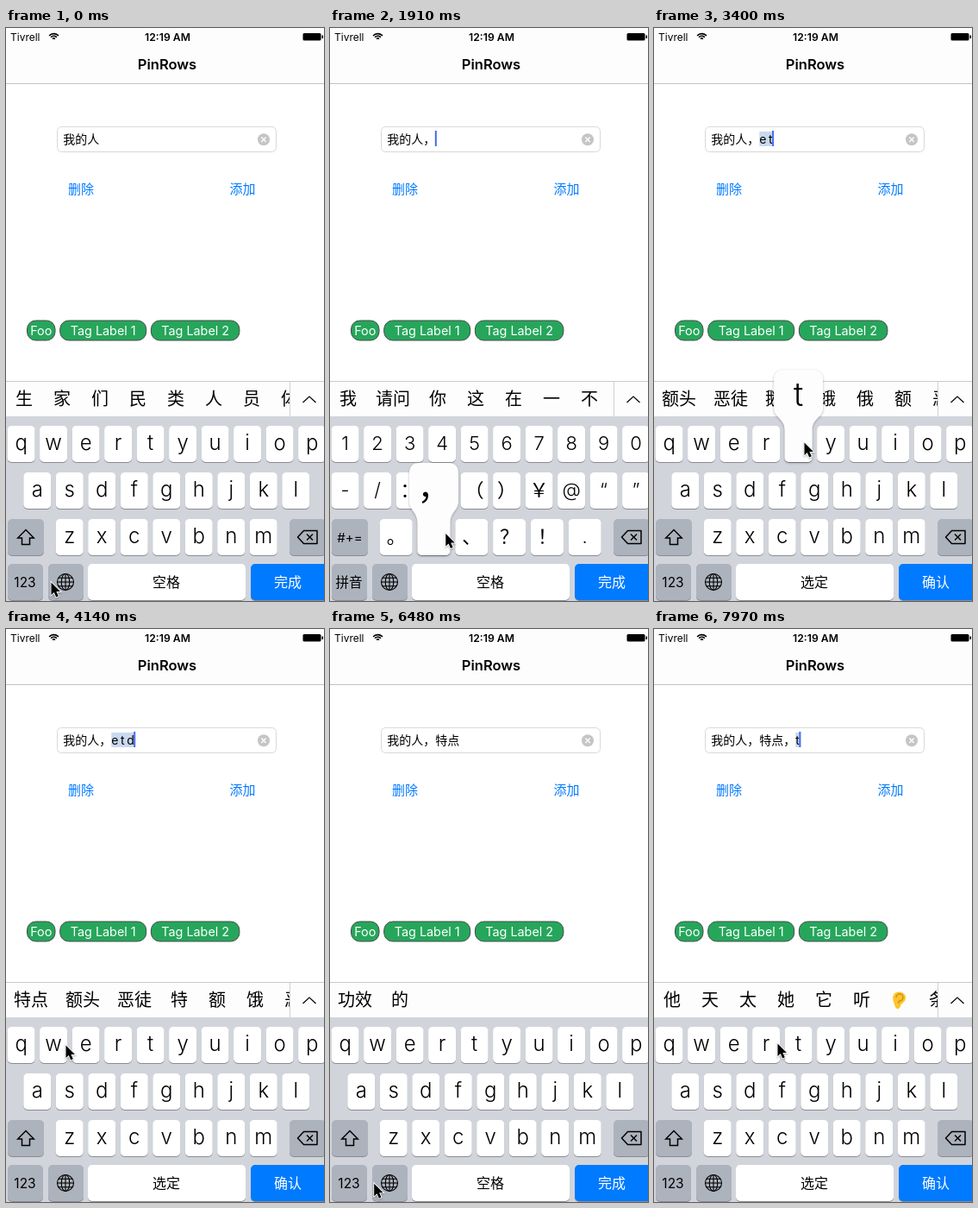
Animation of 369x664 px, one loop 8 s. Source, as an HTML page with a canvas:

```html
<!DOCTYPE html>
<html lang="zh">
<head>
<meta charset="utf-8">
<title>Tag keyboard</title>
<style>
html, body { margin: 0; width: 100%; height: 100%; overflow: hidden; background: #fff; }
canvas { display: block; width: 369px; height: 664px; }
</style>
</head>
<body>
<canvas id="stage"></canvas>
<script>
const W = 369, H = 664, LOOP = 8000, STEP = 147.5, HOLD = 2;
const canvas = document.getElementById('stage');
const c = canvas.getContext('2d');
const dpr = window.devicePixelRatio || 1;
canvas.width = W * dpr;
canvas.height = H * dpr;

const CJK = '"Noto Sans CJK SC", "Noto Sans CJK", sans-serif';
const FONT = 'Inter, ' + CJK;
const BLUE = '#007aff', GRAY = '#adb3bd';

// Pointer stops; a stop with a key is a tap, which drives everything else
const stops = [
  { at: 0, x: 52, y: 642 },
  { at: 9, x: 22, y: 638, key: '123' },
  { at: 12, x: 134, y: 586, key: '，' },
  { at: 17, x: 132, y: 581 },
  { at: 18, x: 98, y: 503 },
  { at: 20, x: 94, y: 487, key: 'e' },
  { at: 23, x: 174, y: 480, key: 't' },
  { at: 26, x: 110, y: 532, key: 'd' },
  { at: 30, x: 28, y: 432, key: '特点' },
  { at: 33, x: 65, y: 487 },
  { at: 39, x: 297, y: 644 },
  { at: 45, x: 31, y: 642, key: '123' },
  { at: 48, x: 134, y: 586, key: '，' },
  { at: 52, x: 165, y: 482, key: 't' },
  { at: 54, x: 143, y: 480 }
];

// Candidates by the latest input
const suggestions = {
  '人': '生 家 们 民 类 人 员 体',
  '，': '我 请问 你 这 在 一 不',
  'e': '额 饿 恶 鹅 俄 呃 而 二',
  'e t': '额头 恶徒 鹅头 蛾 俄 额 恶',
  'e t d': '特点 额头 恶徒 特 额 饿 恶',
  '点': '功效 的',
  't': '他 天 太 她 它 听 👂 条'
};

// Replays the taps up to step n
function stateAt(n) {
  const s = { text: '我的人', comp: '', numeric: false, edit: -6, press: '' };
  for (const { at, key } of stops.filter(p => p.key && p.at <= n)) {
    const held = n < at + HOLD;
    if (key === '123') {
      s.numeric = true;
      continue;
    }
    if (/[a-z]/.test(key)) {
      s.comp += (s.comp && ' ') + key;
    } else {
      s.text += key;
      s.comp = '';
      s.edit = at + 1;
    }
    s.numeric = s.numeric && held;
    s.press = held ? key : '';
  }
  s.words = suggestions[s.comp || s.text.slice(-1)].split(' ');
  s.caret = s.comp || n - s.edit < 4 ? 1 : blink(n - s.edit);
  return s;
}

function blink(age) {
  return Math.min(1, Math.max(0, .5 + 2 * Math.cos(2 * Math.PI * (age - 3.25) / 7)));
}

function text(s, x, y, size, { color = '#000', align = 'left', weight = 400, family = FONT } = {}) {
  c.font = `${weight} ${size}px ${family}`;
  c.textAlign = align;
  c.fillStyle = color;
  c.fillText(s, x, y);
}

function rect(x, y, w, h, color) {
  c.fillStyle = color;
  c.fillRect(x, y, w, h);
}

function round(x, y, w, h, r, fill, stroke) {
  c.beginPath();
  c.roundRect(x, y, w, h, r);
  c.fillStyle = fill;
  c.fill();
  if (!stroke) return;
  c.strokeStyle = stroke;
  c.lineWidth = 1;
  c.stroke();
}

function line(points, width = 1, color = '#000', close = false) {
  c.beginPath();
  points.forEach(([x, y]) => c.lineTo(x, y));
  if (close) c.closePath();
  c.strokeStyle = color;
  c.lineWidth = width;
  c.stroke();
}

function cross(x, y, r, width, color) {
  line([[x - r, y - r], [x + r, y + r]], width, color);
  line([[x + r, y - r], [x - r, y + r]], width, color);
}

function header() {
  rect(0, 0, W, 64, '#fdfdfd');
  rect(0, 64, W, 1, '#c2c2c2');
  text('Tivrell', 5, 14.5, 12);
  c.strokeStyle = '#000';
  c.lineWidth = 1.6;
  for (const r of [2, 4.7, 7.4]) {
    c.beginPath();
    c.arc(55.5, 14, r, -Math.PI * .76, -Math.PI * .24);
    c.stroke();
  }
  text('12:19 AM', 187.5, 14.5, 12.2, { align: 'center', weight: 600 });
  round(344.5, 6, 21, 8.5, 1.5, '#000');
  rect(366.5, 8.5, 1.5, 3.5, '#000');
  text('PinRows', 187, 48, 16.5, { align: 'center', weight: 600 });
}

function form({ text: value, comp, caret }) {
  round(59.5, 114.5, 254, 29, 5, '#fff', '#d9d9d9');
  text(value, 66.3, 133.7, 14, { family: CJK });
  const x = 66.3 + value.length * 14;
  const spaced = comp.replace(/ /g, '\u2009');
  c.font = `400 14px ${FONT}`;
  const w = c.measureText(spaced).width;
  rect(x, 120, w, 17, '#c9d9ef');
  text(spaced, x, 133.7, 14);
  c.globalAlpha = caret;
  rect(x + w - .5, 119, 2, 18, '#426bf2');
  c.globalAlpha = 1;

  round(292, 122.3, 14, 14, 7, '#c5c5c8');
  cross(299, 129.3, 2.7, 1.4, '#fff');
  text('删除', 72, 191.7, 15, { color: BLUE, family: CJK });
  text('添加', 259.5, 191.7, 15, { color: BLUE, family: CJK });

  let left = 24.5;
  for (const [label, width] of [['Foo', 32.5], ['Tag Label 1', 100], ['Tag Label 2', 102.5]]) {
    round(left, 339, width, 23, 10, '#26a65b', '#454d48');
    text(label, left + width / 2, 356, 14.4, { color: '#fff', align: 'center' });
    left += width + 5.7;
  }
}

function ear(x, y) {
  c.beginPath();
  c.moveTo(x - 5, y + 8);
  c.bezierCurveTo(x - 7, y + 2, x - 9, y - 2, x - 7, y - 6);
  c.bezierCurveTo(x - 4, y - 12, x + 7, y - 10, x + 7, y - 3);
  c.bezierCurveTo(x + 7, y + 3, x + 2, y + 3, x + 1, y + 7);
  c.bezierCurveTo(x, y + 11, x - 4, y + 11, x - 5, y + 8);
  c.fillStyle = '#fbc62c';
  c.fill();
  c.beginPath();
  c.arc(x, y - 3, 4, Math.PI, Math.PI * 2.3);
  c.quadraticCurveTo(x - 2, y + 1, x - 1, y + 4);
  c.strokeStyle = '#d58a1c';
  c.lineWidth = 1.5;
  c.stroke();
}

function bar(words) {
  rect(0, 409, W, 41, '#fdfdfd');
  rect(0, 409, W, 1, '#c9cacc');
  const more = words.length > 2;
  c.save();
  c.beginPath();
  c.rect(0, 409, more ? 330 : W, 41);
  c.clip();
  let x = 0;
  for (const word of words) {
    const count = [...word].length, cell = count > 1 ? 60 : 44;
    if (word === '👂') ear(x + 21, 430);
    else text(word, x + cell / 2 - 1, 437, 20, { align: 'center', family: CJK });
    x += cell;
  }
  c.restore();
  if (!more) return;
  rect(329, 409, 1, 41, '#cfd0d2');
  line([[344.5, 434], [352, 427], [359.5, 434]], 1.2);
}

function cap(x, y, w, color = '#fff') {
  round(x, y + 1, w, 42, 5, '#898c91');
  round(x, y, w, 42, 5, color);
}

function keyRow(chars, x0, y, pitch = 37.5, w = 32) {
  return [...chars].map((s, i) => ({ s, x: x0 + i * pitch, y, w }));
}

const letters = [
  ...keyRow('qwertyuiop', 1.6, 461), ...keyRow('asdfghjkl', 20.3, 515), ...keyRow('zxcvbnm', 57.7, 569)
];
const symbols = [
  ...keyRow('1234567890', 1.6, 461), ...keyRow('-/：；（）￥@“”', 1.6, 515),
  ...keyRow('。，、？！.', 57.7, 569, 43.8, 38)
];

function popup({ s, x, y, w }) {
  const m = x + w / 2, top = y - 65, half = 28.5, foot = w / 2, bottom = y + 42;
  c.save();
  c.shadowColor = 'rgba(0,0,0,.28)';
  c.shadowBlur = 3;
  c.shadowOffsetY = 1;
  c.beginPath();
  c.moveTo(m, top);
  c.arcTo(m + half, top, m + half, top + 10, 10);
  c.lineTo(m + half, top + 44);
  c.bezierCurveTo(m + half, top + 56, m + foot, top + 56, m + foot, top + 70);
  c.arcTo(m + foot, bottom, m, bottom, 5);
  c.arcTo(m - foot, bottom, m - foot, top + 70, 5);
  c.lineTo(m - foot, top + 70);
  c.bezierCurveTo(m - foot, top + 56, m - half, top + 56, m - half, top + 44);
  c.arcTo(m - half, top, m, top, 10);
  c.fillStyle = '#fdfdfd';
  c.fill();
  c.restore();
  text(s, m, top + 42, 38, { align: 'center', weight: 350 });
}

function shiftIcon(x, y) {
  const side = d => [[9.3 * d, 1], [4.5 * d, 1], [4.5 * d, 8.5]].map(([dx, dy]) => [x + dx, y + dy]);
  line([[x, y - 8.5], ...side(1), ...side(-1).reverse()], 1.5, '#000', true);
}

function deleteIcon(x, y) {
  c.lineJoin = 'round';
  line([[x, y], [x + 7, y - 7.5], [x + 22.5, y - 7.5], [x + 22.5, y + 7.5], [x + 7, y + 7.5]], 1.5, '#000', true);
  cross(x + 14, y, 3.5, 1.5);
  c.lineJoin = 'miter';
}

function globe(x, y, r) {
  c.strokeStyle = '#000';
  c.lineWidth = 1.1;
  for (const rx of [r, r / 2, 0]) {
    c.beginPath();
    c.ellipse(x, y, rx, r, 0, 0, 7);
    c.stroke();
  }
  for (const dy of [-r / 2, 0, r / 2]) {
    const dx = Math.sqrt(r * r - dy * dy);
    line([[x - dx, y + dy], [x + dx, y + dy]], 1.1);
  }
}

function keyboard({ numeric, comp, press }) {
  rect(0, 450, W, 214, '#d1d5db');
  const keys = numeric ? symbols : letters;
  for (const k of keys) {
    cap(k.x, k.y, k.w);
    text(k.s, k.x + k.w / 2, k.y + 27.5, numeric ? 22 : 24, { align: 'center', weight: 350 });
  }
  cap(2, 569, 42, GRAY);
  if (numeric) text('#+=', 23, 595.5, 15, { align: 'center' });
  else shiftIcon(23, 590);
  cap(329, 569, 42, GRAY);
  deleteIcon(338.5, 590);

  cap(2, 621, 41, GRAY);
  text(numeric ? '拼音' : '123', 22, 647.7, 15.5, { align: 'center' });
  cap(49, 621, 41, GRAY);
  globe(69, 642, 9.5);
  cap(95, 621, 183);
  text(comp ? '选定' : '空格', 186, 648, 16, { align: 'center', family: CJK });
  cap(284, 621, 90, BLUE);
  text(comp ? '确认' : '完成', 327, 648, 16, { color: '#fff', align: 'center', family: CJK });

  const key = keys.find(k => k.s === press);
  if (key) popup(key);
}

function pointer(n) {
  const i = Math.max(1, stops.findIndex(p => p.at >= n));
  const a = stops[i - 1], b = stops[i];
  const k = (n - a.at) / (b.at - a.at), ease = k * k * (3 - 2 * k);
  c.save();
  c.translate(a.x + (b.x - a.x) * ease, a.y + (b.y - a.y) * ease);
  c.shadowColor = 'rgba(0,0,0,.3)';
  c.shadowBlur = 2;
  c.shadowOffsetY = 1;
  line([[.5, .5], [.5, 15], [3.8, 12], [6.2, 17.5], [8.8, 16.3], [6.4, 11], [11, 11]], 1.8, '#fff', true);
  c.shadowColor = 'transparent';
  c.fillStyle = '#000';
  c.fill();
  c.restore();
}

function draw(t) {
  const n = Math.min(54, Math.floor((t + 12) / STEP));
  const state = stateAt(n);
  c.setTransform(dpr, 0, 0, dpr, 0, 0);
  rect(0, 0, W, H, '#fff');
  header();
  form(state);
  bar(state.words);
  keyboard(state);
  pointer(n);
}

const start = performance.now();
function tick() {
  draw((performance.now() - start) % LOOP);
  requestAnimationFrame(tick);
}
tick();
</script>
</body>
</html>
```
